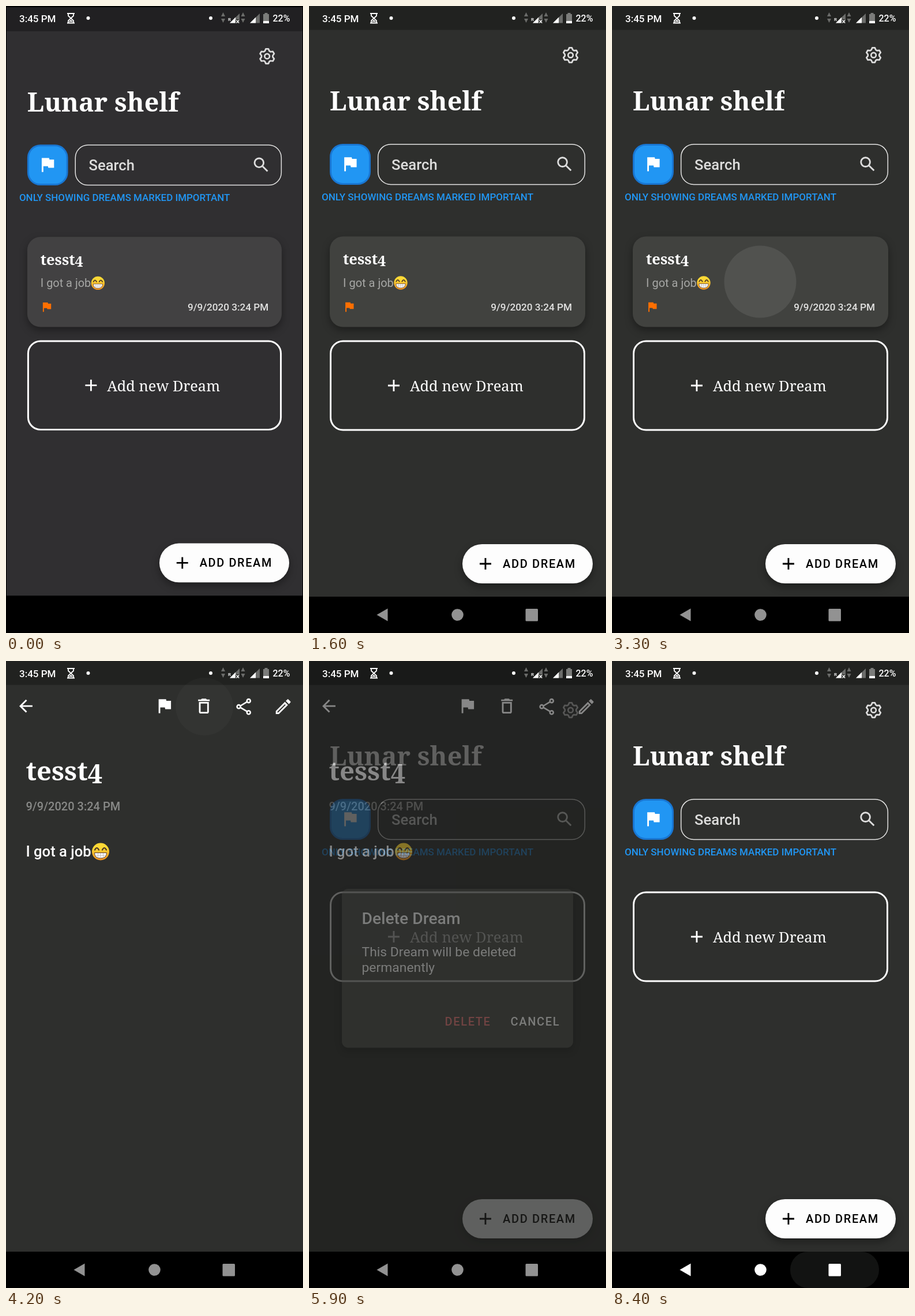
Recreate the animation shown at these times as an HTML page. Size 515x1087 px, loop 8.5 s.

```html
<!DOCTYPE html>
<html lang="en">
<head>
<meta charset="utf-8">
<title>Journal app</title>
<style>
  html, body { margin: 0; width: 100%; height: 100%; overflow: hidden; background: #000; }
  svg { display: block; width: 100%; height: 100%; --bg: #2e2f2d; --card: #41423f; --bar: #212220; }
  text { font-family: Roboto, "Liberation Sans", sans-serif; fill: #fff; white-space: pre; }
  .med { font-weight: 500; }
  .slab { font-family: "Noto Serif", "Liberation Serif", serif; }
  .bold { font-weight: 700; }
  .btn { font-size: 20px; font-weight: 500; letter-spacing: 1.65px; }
  .page { fill: var(--bg); }
  .bar { fill: var(--bar); }
  .card { fill: var(--card); }
  .raised { filter: drop-shadow(0 6px 7px rgba(0, 0, 0, .36)); }
  .line { fill: none; stroke: #fff; }
</style>
</head>
<body>
<svg viewBox="0 0 515 1087" preserveAspectRatio="none">
  <defs>
    <path id="flag" d="M14.4 6L14 4H5v17h2v-7h5.6l.4 2h7V6z"/>
    <path id="plus" d="M19 13h-6v6h-2v-6H5v-2h6V5h2v6h6z"/>
    <path id="back" d="M20 11H7.8l5.6-5.6L12 4l-8 8 8 8 1.4-1.4L7.8 13H20z"/>
    <path id="bin" fill-rule="evenodd" d="M6 19c0 1.1.9 2 2 2h8c1.1 0 2-.9 2-2V7H6zM8 9h8v10H8zM15.5 4l-1-1h-5l-1 1H5v2h14V4z"/>
    <path id="pen" fill-rule="evenodd" d="M14.06 9.02l.92.92L5.92 19H5v-.92zM17.66 3c-.25 0-.51.1-.7.29l-1.83 1.83 3.75 3.75 1.83-1.83a1 1 0 0 0 0-1.41l-2.34-2.34c-.2-.2-.45-.29-.71-.29zM14.06 6.19L3 17.25V21h3.75L17.81 9.94z"/>
    <g id="lens" fill="none" stroke="#ddd" stroke-width="2">
      <circle cx="9.5" cy="9.5" r="5.5"/><path d="M13.8 13.8l6 6"/>
    </g>
    <g id="share" class="line" stroke-width="1.8">
      <path d="M8 11l8-4.8M8 13l8 4.8"/>
      <circle cx="6" cy="12" r="2.1"/><circle cx="18" cy="5" r="2.1"/><circle cx="18" cy="19" r="2.1"/>
    </g>
    <g id="gear" fill="none" stroke="#ddd" stroke-width="1.9" stroke-linejoin="round">
      <path id="teeth"/><circle cx="12" cy="12" r="3"/>
    </g>
    <linearGradient id="skin" x2="0" y2="1">
      <stop offset=".3" stop-color="#fdd835"/><stop offset="1" stop-color="#f2901f"/>
    </linearGradient>
    <g id="grin">
      <circle r="15" fill="url(#skin)"/>
      <path d="M-10-3q3.5-7 7 0M3-3q3.5-7 7 0" fill="none" stroke="#4b3526" stroke-width="2.2" stroke-linecap="round"/>
      <path d="M-10.5 2h21q0 9.5-10.5 9.5T-10.5 2z" fill="#fff" stroke="#5b4130" stroke-width="1"/>
      <path d="M-9.5 6.5h19M-4.5 2.5v8.5M0 2.5v9M4.5 2.5v8.5" stroke="#b9aea5" stroke-width=".8"/>
    </g>
    <g id="arrows" fill="#6b6c6a"><path d="M-3.5-3L0-10 3.5-3zM-3.5 1h7L0 8z"/></g>
    <clipPath id="cardClip"><rect x="36" y="399.500" width="443" height="157" rx="23"/></clipPath>
    <clipPath id="titleClip"><rect id="titleBox" x="34" y="130" width="290" height="75"/></clipPath>
  </defs>

  <g id="home">
    <rect class="page" width="515" height="1024"/>
    <rect class="bar" width="515" height="41.500"/>
    <use href="#gear" transform="translate(436.400 68) scale(1.430)"/>
    <text class="slab bold" x="36" y="181" font-size="45" clip-path="url(#titleClip)">Lunar shelf</text>

    <rect x="37.500" y="240.500" width="68" height="68" rx="21" fill="#2196f3" stroke="#1976d2" stroke-width="3"/>
    <use href="#flag" transform="translate(54 256.500) scale(1.430)" fill="#fff"/>
    <rect x="119.700" y="239.700" width="358.600" height="69.800" rx="22" class="line" style="stroke:#e4e4e3" stroke-width="1.500"/>
    <text class="med" x="143" y="284" font-size="25.700" style="fill:#dcdcdb">Search</text>
    <use href="#lens" transform="translate(426 257) scale(1.430)"/>
    <text class="med" x="22" y="337.300" font-size="17" style="fill:#2196f3">ONLY SHOWING DREAMS MARKED IMPORTANT</text>

    <g id="entry">
      <rect class="card raised" x="36" y="399.500" width="443" height="157" rx="23"/>
      <g clip-path="url(#cardClip)"><circle id="cardInk" cx="257" cy="478" fill="#fff"/></g>
      <text class="slab bold" x="59" y="448" font-size="25.500">tesst<tspan dy="3">4</tspan></text>
      <text x="59" y="486.500" font-size="20" style="fill:#a6a7a5">I got a job</text>
      <use href="#grin" transform="translate(159 480) scale(.780)"/>
      <use href="#flag" transform="translate(58.300 510) scale(.960)" fill="#ff6f00"/>
      <text class="med" x="456" y="528" font-size="17.200" text-anchor="end" style="fill:#e2e2e1">9/9/2020 3:24 PM</text>
    </g>
    <g id="adder">
      <rect x="37.500" y="581" width="440" height="154" rx="21.500" class="line" stroke-width="3"/>
      <use href="#plus" transform="translate(129.800 640.800) scale(1.430)" fill="#fff"/>
      <text class="slab" x="175" y="668" font-size="25.500">Add new Dream</text>
    </g>

    <rect class="raised" x="266" y="933" width="226" height="68" rx="34" fill="#fdfdfd"/>
    <use href="#plus" transform="translate(288.800 949.800) scale(1.430)"/>
    <text class="btn" x="336" y="974" style="fill:#000">ADD DREAM</text>
  </g>

  <g id="detail">
    <rect class="page" width="515" height="1024"/>
    <rect class="bar" width="515" height="41.500"/>
    <circle id="binInk" cx="344" cy="79" fill="#fff"/>
    <g fill="#fff">
      <use href="#back" transform="translate(17.300 61) scale(1.430)"/>
      <use href="#flag" transform="translate(257.500 60.500) scale(1.430)"/>
      <use href="#bin" transform="translate(326 61) scale(1.430)"/>
      <use href="#share" transform="translate(395 62) scale(1.430)"/>
      <use href="#pen" transform="translate(463.500 62) scale(1.430)"/>
    </g>
    <g id="heading">
      <text class="slab bold" x="34.500" y="207" font-size="45.500">tesst<tspan dy="5">4</tspan></text>
      <text class="med" x="34.500" y="259" font-size="20" style="fill:#888987">9/9/2020 3:24 PM</text>
    </g>
    <text class="med" x="34.500" y="339" font-size="25.600">I got a job</text>
    <use href="#grin" transform="translate(164 330.500)"/>
  </g>

  <rect id="shade" width="515" height="1024"/>
  <g id="dialog">
    <rect class="card raised" x="57" y="395" width="401" height="275.500" rx="11"/>
    <text class="med" x="91.500" y="456" font-size="28.300">Delete Dream</text>
    <text x="91.500" y="512" font-size="22.900">This Dream will be deleted</text>
    <text x="91.500" y="539" font-size="22.900">permanently</text>
    <text class="btn" x="235.500" y="632" style="fill:#e57373">DELETE</text>
    <text class="btn" x="349.500" y="632">CANCEL</text>
  </g>

  <g fill="#fff">
    <text class="med" x="23" y="28" font-size="17">3:45 PM</text>
    <path class="line" stroke-width="1.800" d="M106 13h13M106 29.500h13M108 13v4l4.500 4.200L117 17v-4M108 29.500v-4l4.500-4.300 4.500 4.300v4M110 27.500l2.500-2.500 2.500 2.500"/>
    <circle cx="142.500" cy="21" r="3"/><circle cx="355" cy="21" r="3"/>
    <use href="#arrows" x="376.500" y="21"/><use href="#arrows" x="411" y="21"/>
    <path fill="#6b6c6a" d="M388 29.500L405 13v16.500zM423 29.500L440 13v16.500z"/>
    <path d="M388 29.500l10-10v10zM423 29.500l10-10v10z"/>
    <text class="med" x="385" y="26" font-size="8">R</text>
    <path d="M399 24l5 5.500m0-5.500l-5 5.500" stroke="#212220" stroke-width="4"/>
    <path d="M399.500 24.500l4.500 5m0-5l-4.500 5" stroke="#fff" stroke-width="1.500"/>
    <path fill="#7b7c7a" d="M448.500 12h5v2h2.500v16h-10V14h2.500z"/>
    <path d="M446 26h10v4h-10z"/>
    <text class="med" x="462.500" y="27" font-size="16">22%</text>
  </g>

  <rect y="1024" width="515" height="63"/>
  <rect id="navInk" y="1024" height="63" rx="31" fill="#121312"/>
  <g id="nav">
    <path d="M117.500 1055.500L136.500 1044.500v22z" stroke-width="1" stroke-linejoin="round"/>
    <circle cx="257.500" cy="1055.500" r="10.300"/>
    <rect x="375.500" y="1045" width="21.500" height="21.500" rx="1.500"/>
  </g>
</svg>
<script>
const LOOP = 8500, STEP = 100;
const el = {};
document.querySelectorAll('[id]').forEach(e => el[e.id] = e);
const root = document.querySelector('svg');
const set = (id, attrs) => { for (const k in attrs) el[id].setAttribute(k, attrs[k]); };

// Six-toothed outline in a 24-unit icon box.
const gear = [];
for (let i = 0; i < 6; i++)
  for (const [off, r] of [[-23, 6.9], [-10, 9.1], [10, 9.1], [23, 6.9]]) {
    const a = (i * 60 + off - 90) * Math.PI / 180;
    gear.push((12 + r * Math.cos(a)).toFixed(2) + ' ' + (12 + r * Math.sin(a)).toFixed(2));
  }
set('teeth', { d: 'M' + gear.join('L') + 'z' });

// Each track is a list of [time, value] points joined by straight lines.
const tracks = {
  settle: [[0, 0], [400, 1]],
  title: [[3200, 290], [3300, 265], [3400, 165], [3500, 0]],
  cardR: [[3200, 0], [3600, 250]],
  cardA: [[3200, .09], [3500, .07], [3700, 0]],
  detail: [[3400, 0], [3500, .15], [3700, .85], [3800, 1], [5800, 1], [5900, .62], [6000, .25], [6100, .06], [6200, 0]],
  heading: [[3500, 0], [3800, 1]],
  binR: [[4000, 0], [4100, 30], [4200, 50]],
  binA: [[4000, .04], [4200, .025], [4400, 0]],
  shade: [[4200, 0], [4300, .32], [4400, .57], [5800, .57], [5900, .23], [6000, .1], [6100, .03], [6200, 0]],
  dialog: [[4200, 0], [4300, .5], [4400, 1], [5800, 1], [5900, .4], [6000, .15], [6100, .03], [6200, 0]],
  press: [[8100, 0], [8400, 1]]
};

function value(points, t) {
  if (t <= points[0][0]) return points[0][1];
  for (let i = 1; i < points.length; i++) {
    const [t0, v0] = points[i - 1], [t1, v1] = points[i];
    if (t <= t1) return v0 + (v1 - v0) * (t - t0) / (t1 - t0);
  }
  return points[points.length - 1][1];
}

const mix = (a, b, k) => `rgb(${a.map((v, i) => Math.round(v + (b[i] - v) * k))})`;

function render(t) {
  const v = {};
  for (const k in tracks) v[k] = value(tracks[k], t);

  const s = .996 + .004 * v.settle;
  root.style.setProperty('--bg', mix([48, 47, 49], [46, 47, 45], v.settle));
  root.style.setProperty('--card', mix([66, 65, 66], [65, 66, 63], v.settle));
  root.style.setProperty('--bar', mix([33, 32, 34], [33, 34, 32], v.settle));
  set('home', { transform: `translate(257.5 580) scale(${s}) translate(-257.5 -580)` });

  const deleted = t >= 5900;
  set('entry', { visibility: deleted ? 'hidden' : 'visible' });
  set('adder', { transform: `translate(0 ${deleted ? -180 : 0})` });
  set('titleBox', { width: t < 5000 ? v.title : 290 });
  set('cardInk', { r: v.cardR, opacity: v.cardA });
  set('detail', { opacity: v.detail });
  set('heading', { opacity: v.heading });
  set('binInk', { r: v.binR, opacity: v.binA });
  set('shade', { opacity: v.shade });
  set('dialog', { opacity: v.dialog });

  const grey = 146 + 109 * v.press, w = 154 * (.4 + .6 * v.press);
  set('nav', { fill: `rgb(${grey},${grey},${grey})`, opacity: v.settle });
  set('navInk', { x: 386 - w / 2, width: w, opacity: v.press });
}

const start = performance.now();
function tick() {
  const t = (performance.now() - start) % LOOP;
  render(Math.floor(t / STEP) * STEP);
  requestAnimationFrame(tick);
}
render(0);
tick();
</script>
</body>
</html>
```
